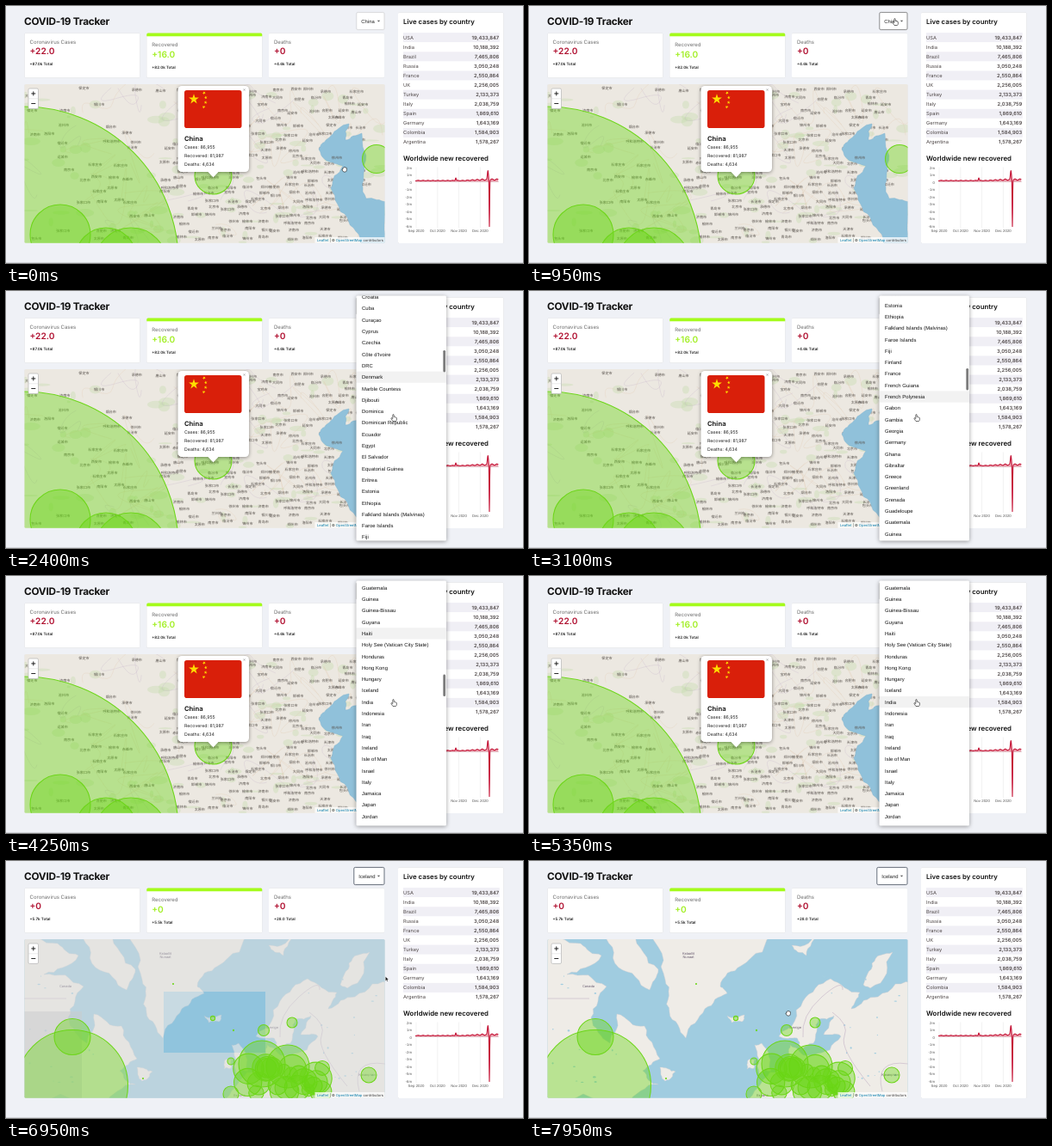
These frames come from a looping animation (600x299 px, 8000 ms). An HTML page:

```html
<!DOCTYPE html>
<html lang="en">
<head>
<meta charset="utf-8">
<title>COVID-19 Tracker</title>
<style>
  html, body { margin: 0; width: 100%; height: 100%; overflow: hidden; background: #eff1f6; }
  svg { display: block; width: 100vw; height: 100vh; }
  text { font-family: Inter, sans-serif; text-rendering: geometricPrecision; white-space: pre; }
  .menu text, .helv { font-family: "Liberation Sans", Arial, sans-serif; letter-spacing: .055px; }
  .cjk { font-family: "Noto Sans CJK SC", "Noto Sans CJK", sans-serif; font-weight: 500; }
  .card { fill: #fff; filter: drop-shadow(0 .6px .7px rgba(0,0,0,.2)); }
  .bubble { fill: #66d413; fill-opacity: .4; stroke: #6fd61c; stroke-width: 1.1; }
  .land { fill: #efece7; stroke: #c9c9cf; stroke-width: .4; }
</style>
</head>
<body>
<svg id="stage" viewBox="0 0 600 299" preserveAspectRatio="none"></svg>
<script>
const LOOP = 8000, PITCH = 13.3, SWITCH = 6870, CLOSE = 6530;
const CHINA = 10, ICELAND = 60;
const COUNTRIES = ("Cabo Verde|Cambodia|Cameroon|Canada|Caribbean Netherlands|Cayman Islands|" +
  "Central African Republic|Chad|Channel Islands|Chile|China|Colombia|Comoros|Congo|Costa Rica|Croatia|" +
  "Cuba|Curaçao|Cyprus|Czechia|Côte d'Ivoire|DRC|Denmark|Marble Countess|Djibouti|Dominica|" +
  "Dominican Republic|Ecuador|Egypt|El Salvador|Equatorial Guinea|Eritrea|Estonia|Ethiopia|" +
  "Falkland Islands (Malvinas)|Faroe Islands|Fiji|Finland|France|French Guiana|French Polynesia|Gabon|" +
  "Gambia|Georgia|Germany|Ghana|Gibraltar|Greece|Greenland|Grenada|Guadeloupe|Guatemala|Guinea|" +
  "Guinea-Bissau|Guyana|Haiti|Holy See (Vatican City State)|Honduras|Hong Kong|Hungary|Iceland|India|" +
  "Indonesia|Iran|Iraq|Ireland|Isle of Man|Israel|Italy|Jamaica|Japan|Jordan").split("|");
const LIVE = ("USA 19,433,847|India 10,188,392|Brazil 7,465,806|Russia 3,050,248|France 2,550,864|" +
  "UK 2,256,005|Turkey 2,133,373|Italy 2,038,759|Spain 1,869,610|Germany 1,643,169|" +
  "Colombia 1,584,903|Argentina 1,578,267").split("|").map(row => row.split(" "));
const CITIES = ("北京市 天津市 大同市 张家口市 承德市 唐山市 保定市 石家庄市 太原市 济南市 青岛市 烟台市 " +
  "徐州市 郑州市 洛阳市 西安市 兰州市 银川市 包头市 呼和浩特市 临汾市 长治市 邯郸市 沧州市 " +
  "运城市 宝鸡市 延安市 榆林市 南阳市 合肥市 南京市 宿迁市 赤峰市 锦州市").split(" ");

let seed = 11;
const rnd = () => (seed = (seed * 16807) % 2147483647) / 2147483647;
const between = (a, b) => a + rnd() * (b - a);
const times = (n, make) => Array.from({ length: n }, (_, i) => make(i)).join("");
const text = (x, y, s, size, fill = "#222", attrs = "") =>
  `<text x="${x}" y="${y}" font-size="${size}" fill="${fill}" ${attrs}>${s}</text>`;
const rect = (x, y, w, h, fill, attrs = "") =>
  `<rect x="${x}" y="${y}" width="${w}" height="${h}" fill="${fill}" ${attrs}/>`;
const path = (d, fill, attrs = "") => `<path d="${d}" fill="${fill}" ${attrs}/>`;
const ellipse = (x, y, rx, ry, fill, attrs = "") =>
  `<ellipse cx="${x}" cy="${y}" rx="${rx}" ry="${ry}" fill="${fill}" ${attrs}/>`;
const bubble = (x, y, r) => `<circle class="bubble" cx="${x}" cy="${y}" r="${r}"/>`;
const BOLD = 'font-weight="700"', SEMI = 'font-weight="600"', END = 'text-anchor="end"', MID = 'text-anchor="middle"';

// Closed coastline: every edge is split in halves that shift at random.
function coast(corners, wobble = .16, depth = 3) {
  let pts = corners.split(" ").map(p => p.split(",").map(Number));
  for (let n = 0; n < depth; n++)
    pts = pts.flatMap(([x, y], i) => {
      const [u, v] = pts[(i + 1) % pts.length], k = between(-wobble, wobble);
      return [[x, y], [(x + u) / 2 + (v - y) * k, (y + v) / 2 - (u - x) * k]];
    });
  return "M" + pts.map(p => p.map(c => c.toFixed(1)).join(" ")).join("L") + "Z";
}

function star(cx, cy, r, turn = 0) {
  const corner = i => {
    const a = turn + i * Math.PI / 5 - Math.PI / 2, k = i % 2 ? r * .38 : r;
    return `${cx + k * Math.cos(a)},${cy + k * Math.sin(a)} `;
  };
  return `<polygon points="${times(10, corner)}" fill="#ffde00"/>`;
}

function statCard(i, label, color, values, totals) {
  const active = i === 1, x = 21.5 + i * 141.75, dy = active ? 3.6 : 0, tx = x + 6;
  return rect(x, 31.5, 134, 52, "#fff", 'class="card" rx="1.5"') +
    (active ? path(`M${x} 35.3v-2.3q0-1.5 1.5-1.5h131q1.5 0 1.5 1.5v2.3z`, "#a4fb1b") : "") +
    text(tx, 43.6 + dy, label, 6, "#6c6c6c") +
    times(2, k => `<g class="at${k}">` + text(tx, 56.2 + dy, values[k], 10.2, color, SEMI) +
      text(tx, 69 + dy, totals[k] + " Total", 4.5, "#222", SEMI) + "</g>");
}

function chinaMap() {
  const woods = times(110, () => ellipse(between(22, 440), between(100, 276), between(2, 11), between(1, 6), "#c3dbac", 'opacity=".38"'));
  const hop = () => `${between(-30, 30)} ${between(-25, 25)}`;
  const roads = times(46, i => path(`M${between(22, 422)} ${between(92, 272)}q${hop()} ${hop()}t${hop()}t${hop()}`, "none",
    `stroke="${i % 3 ? "#e0c8b2" : "#c5b6c8"}" stroke-width=".4" opacity=".75"`));
  const label = (x, y) => text(x, y, CITIES[Math.floor(rnd() * CITIES.length)], 4.1, "#57514c", 'class="cjk" ' + MID);
  const labels = times(21, row => times(21, col => {
    const x = 32 + col * 19 + between(-6, 6), y = 99 + row * 8.6 + between(-2.5, 2.5);
    return rnd() < (x < 200 ? .2 : .68) ? label(x, y) : "";
  }));
  const sea = coast("363,166 377,151 398,137 394,156 413,148 416,190 418,224 442,228 442,280 412,280 396,246 377,212 391,186 372,180", .12);
  return rect(21, 91, 419, 185, "#ece8e1") + woods + roads + labels +
    path(sea, "#90c1da", 'stroke="#82b2cc" stroke-width=".4"') + label(384, 178) +
    bubble(20, 297, 180) + bubble(63, 266, 35) + bubble(116, 293, 35) + bubble(145, 300, 42) +
    bubble(240.5, 197.5, 21.5) + bubble(430, 178, 16.5);
}

function popup() {
  const smallStar = i => {
    const a = -.52 + i * .36;
    return star(216 + 16 * Math.cos(a), 109 + 16 * Math.sin(a), 2.1, a);
  };
  const lines = ["Cases: 86,955", "Recovered: 81,987", "Deaths: 4,634"];
  return `<g style="filter:drop-shadow(0 1px 2px rgba(0,0,0,.4))">` +
    rect(199.5, 93, 82.5, 100, "#fff", 'rx="4.5"') + path("M234 192.5h13l-6.5 7z", "#fff") + "</g>" +
    rect(207, 98, 66.5, 44, "#d91f0a", 'rx="2.8"') + star(218, 108.5, 6.2) + times(4, smallStar) +
    text(276.5, 99.3, "×", 5.5, "#999", MID) + text(207, 156.5, "China", 7.6, "#222", BOLD) +
    times(3, i => text(207, 166.4 + i * 9.9, lines[i], 5.25, "#222"));
}

function icelandMap() {
  const greenland = "140,80 158,138 163,176 182,206 204,172 230,154 222,146 246,122 285,80";
  const canada = "10,84 60,96 84,110 44,132 90,146 72,182 94,212 102,178 134,192 152,230 132,244 150,260 116,285 10,285";
  const baffin = "80,82 120,84 150,126 140,150 104,124";
  const europe = "290,204 318,163 350,137 384,153 374,172 405,158 450,140 450,290 245,290 272,254 303,226 303,214 330,226 362,204 342,202 354,180 336,184 330,212 314,218 311,206";
  const isles = ["230,180 250,179 247,187 235,188", "262,214 270,212 281,244 267,247", "254,232 262,231 261,241 253,242",
    "152,240 170,245 158,256", "305,98 340,84 322,110", "388,144 398,119 422,106 396,148"];
  const lands = [greenland, canada, baffin, europe, ...isles];
  const lakes = times(40, i => ellipse(i % 2 ? between(340, 435) : between(24, 104), between(130, 260), between(.4, 2), between(.3, 1.2), "#a2cde0"));
  const borders = path("M318 205Q315 180 340 158T364 150M352 176Q372 190 366 204T396 262M21 160H70M440 236Q400 230 410 268",
    "none", 'stroke="#b9a5bd" stroke-width=".5"');
  const name = (x, y, s) => text(x, y, s, 3.9, "#695c70", MID);
  const cluster = times(24, () => bubble(between(280, 368), between(240, 270), between(7, 19)));
  return rect(21, 91, 419, 185, "#a0cce0") + lands.map(l => path(coast(l), "", 'class="land"')).join("") + lakes + borders +
    name(185, 109, "Kalaallit") + name(185, 113.4, "Nunaat") + name(69, 147, "Canada") +
    name(309, 194.5, "Sverige") + name(271, 273.5, "España") + name(419, 250, "Қазақстан") +
    `<g id="haze"><path fill="#d9dbdc" fill-rule="evenodd" opacity=".48" d="M21 91H440V276H21ZM183 152V223H301V152Z"/>` +
    rect(183, 152, 118, 71, "#6fb4d8", 'opacity=".3"') + rect(21, 175, 67, 101, "#c9cccd", 'opacity=".5"') + "</g>" +
    bubble(77, 261, 64.5) + bubble(77, 204.5, 21) + bubble(240, 183, 2.6) + bubble(299, 197, 6.5) + bubble(332, 188, 6) +
    bubble(261, 233, 4) + bubble(421, 249, 9) + bubble(261, 271, 9) + bubble(297, 236, 27) + bubble(327, 239, 25) +
    bubble(194, 143, .5) + bubble(159, 253, .5) + bubble(264, 197, .6) + cluster;
}

function mapControls() {
  return rect(26, 96, 11.5, 23.5, "#fff", 'rx="1.5" stroke="#b5b5b5" stroke-width=".7"') +
    path("M26 107.8h11.5", "none", 'stroke="#ccc" stroke-width=".4"') +
    path("M29.3 101.9h5M31.8 99.4v5M29.3 113.5h5", "none", 'stroke="#111" stroke-width=".9"') +
    rect(358.5, 269, 81.5, 7, "#fff", 'opacity=".75"') +
    text(438, 273.9, `<tspan fill="#0078a8">Leaflet</tspan> | © <tspan fill="#0078a8">OpenStreetMap</tspan> contributors`, 4.1, "#333", END);
}

function trend(x) {
  const rise = Math.max(0, x - 530) * .05;
  const bump = 3.2 * Math.exp(-((x - 522) ** 2) * 2);
  const peak = 10 * Math.exp(-((x - 559.3) ** 2) * 1.5), drop = 54 * Math.exp(-((x - 561) ** 2) * 6);
  return 203.1 - Math.min(rise, 1.2) + Math.sin(x * 1.1) * (.25 + Math.min(rise, 1.2) * .4) - bump - peak + drop;
}

function sidePanel() {
  const rows = LIVE.map(([name, count], i) => {
    const y = 36.6 + i * 11.08;
    return (i % 2 ? "" : rect(461, y - 5.5, 111.8, 11, "#f0eff5")) +
      text(461, y + 2, name, 5.7, "#4d4646") + text(572.2, y + 2, count, 5.8, "#4d4646", SEMI + " " + END);
  }).join("");
  const ticks = times(9, i => text(471, 189.6 + i * 8.5, i === 2 ? "0" : 2 - i + "m", 4.2, "#555", 'class="helv" ' + END));
  const months = ["Sep", "Oct", "Nov", "Dec"].map((m, i) => {
    const x = 476 + i * 24.8;
    return path(`M${x} 187.5V258`, "none", 'stroke="#ddd" stroke-width=".4"') +
      text(x, 263.2, m + " 2020", 4.3, "#555", 'class="helv" ' + MID);
  }).join("");
  const line = "M475.5 203" + times(384, i => `L${475.5 + i / 4} ${trend(475.5 + i / 4).toFixed(2)}`);
  return rect(455, 7.5, 122.5, 268.5, "#fff", 'class="card" rx="1.5"') +
    text(461, 21.2, "Live cases by country", 7.85, "#111", SEMI) + rows +
    text(461, 179.5, "Worldwide new recovered", 7.85, "#111", SEMI) + ticks + months +
    path("M475.5 204.6H572", "none", 'stroke="#bbb" stroke-width=".4"') +
    path(line + "V204.6H475.5Z", "#cc1034", 'opacity=".4"') +
    path(line, "none", 'stroke="#c41335" stroke-width="1.1" stroke-linejoin="round"');
}

const picker = (x, name, i) => `<g class="at${i}">` +
  rect(x, 7.4, 439 - x, 20.2, "#fff", 'class="picker" rx="1.5"') +
  text(x + 5.4, 19.5, name, 5.9, "#222", 'class="helv"') + path("M430.8 16.7h3.4l-1.7 1.9z", "#555") + "</g>";

const rowTop = i => 7.65 + i * PITCH;
const menu = `<g id="menu" class="menu">` +
  rect(406.5, 5.5, 104.5, 285, "#fff", 'rx="1.5" style="filter:drop-shadow(0 1.8px 2.6px rgba(0,0,0,.38))"') +
  `<g clip-path="url(#menuClip)"><g id="list">` +
  rect(406.5, rowTop(CHINA), 104.5, PITCH, "#000", 'opacity=".07"') +
  rect(406.5, 0, 104.5, PITCH, "#000", 'id="hover" opacity=".05"') +
  `<g clip-path="url(#rowClip)"><circle id="ripple" cx="441" cy="${rowTop(ICELAND + .5)}" opacity=".12"/></g>` +
  COUNTRIES.map((c, i) => text(413, rowTop(i) + 8.75, c, 5.9, "#111")).join("") +
  `</g></g>` + rect(507.3, 49, 2.8, 25.5, "#7c7c7c", 'id="thumb" rx="1.4"') + "</g>";

const INK = 'stroke="#111" stroke-width=".6"';
const cursors = {
  pointer: path("M-1.2-2.6q0-.8.7-.8t.7.8v1.9q1.2-.2 1.3.4 1-.2 1.1.6.8-.1.8.8v1q0 1.6-1 2.4h-3.4q-.9-1.2-2-3-.3-.9.6-.8l1.2.8z", "#fff", INK),
  grab: path("M-2.1-1.2q.4-1.2 1.1-.6.4-1.3 1.2-.4 1-.7 1.2.4 1.1-.3 1 .9v1.6q-.2 1.8-1.2 2.3h-2.4q-.9-.8-1.8-2.4-.3-.9.9-.5z", "#fff", INK),
  arrow: path("M-.6-2.6v5l1.2-1 .8 1.8.8-.4-.8-1.7h1.6z", "#111", 'stroke="#fff" stroke-width=".3"')
};

const stage = document.getElementById("stage");
stage.innerHTML = `<defs>
  <clipPath id="mapClip"><rect x="21.5" y="91" width="418" height="184.7" rx="1.5"/></clipPath>
  <clipPath id="menuClip"><rect x="406.5" y="5.5" width="104.5" height="285" rx="1.5"/></clipPath>
  <clipPath id="rowClip"><rect x="406.5" y="${rowTop(ICELAND)}" width="104.5" height="${PITCH}"/></clipPath></defs>` +
  rect(0, 0, 600, 299, "#eff1f6") + rect(0, 298, 600, 1, "#d3d5da") +
  text(21, 21.7, "COVID-19 Tracker", 11.8, "#111", BOLD + ' letter-spacing="-.25"') +
  picker(406.8, "China", 0) + picker(403.8, "Iceland", 1) +
  statCard(0, "Coronavirus Cases", "#b01030", ["+22.0", "+0"], ["+87.0k", "+5.7k"]) +
  statCard(1, "Recovered", "#a2ef25", ["+16.0", "+0"], ["+82.0k", "+5.5k"]) +
  statCard(2, "Deaths", "#b01030", ["+0", "+0"], ["+4.6k", "+28.0"]) +
  rect(21.5, 91, 418, 184.7, "#ddd", 'class="card" rx="1.5"') +
  `<g clip-path="url(#mapClip)"><g class="at0">${chinaMap()}${popup()}</g><g class="at1">${icelandMap()}</g>${mapControls()}</g>` +
  sidePanel() + menu + `<g id="cursor">` +
  Object.entries(cursors).map(([id, shape]) => `<g id="${id}">${shape}</g>`).join("") + "</g>";

const ramp = (t, from, to) => Math.min(1, Math.max(0, (t - from) / (to - from)));
const smooth = u => u * u * (3 - 2 * u);

const MOVES = [
  { from: 250, to: 820, x: 425, y: 18 },
  { from: 1250, to: 1650, x: 450, y: 147 },
  { from: 5600, to: 6050, x: 441, y: 137 },
  { from: 7100, to: 7700, x: 301, y: 177 }
];
function cursorAt(t) {
  return MOVES.reduce((p, m) => {
    const k = smooth(ramp(t, m.from, m.to));
    return { x: p.x + (m.x - p.x) * k, y: p.y + (m.y - p.y) * k };
  }, { x: 393, y: 190 });
}

// Rows scrolled away, slowing down towards the end.
const scrollAt = t => 51.05 * (1 - (1 - ramp(t, 1800, 4250)) ** 1.29);

// The highlight follows the pointer only now and then while the list scrolls.
function hoverAt(t) {
  const sampled = t > 5000 ? t : 2256 + Math.floor((t - 2256) / 762) * 762;
  const y = sampled < 1650 ? 147 : cursorAt(sampled).y;
  return Math.floor((y - 7.65) / PITCH + scrollAt(sampled));
}

const el = id => document.getElementById(id);
const set = (node, attrs) => Object.entries(attrs).forEach(([k, v]) => node.setAttribute(k, v));
const show = (node, on) => node.style.display = on ? "" : "none";
const scenes = [0, 1].map(i => [...stage.querySelectorAll(".at" + i)]);
const pickers = [...stage.querySelectorAll(".picker")];

function draw(t) {
  const scene = t < SWITCH ? 0 : 1, focused = t > CLOSE;
  scenes.forEach((nodes, i) => nodes.forEach(n => show(n, i === scene)));
  pickers.forEach(p => set(p, {
    stroke: focused ? "#59606e" : t > 780 ? "#444" : "#c6c6c8", "stroke-width": focused ? .9 : .6
  }));

  const open = smooth(ramp(t, 1050, 1280)) - smooth(ramp(t, CLOSE, CLOSE + 210));
  const scroll = scrollAt(t), k = .75 + .25 * open;
  show(el("menu"), open > 0);
  set(el("menu"), { opacity: open, transform: `translate(423 147) scale(${k} ${k * k}) translate(-423 -147)` });
  set(el("list"), { transform: `translate(0 ${-scroll * PITCH})` });
  set(el("hover"), { y: rowTop(hoverAt(t)) });
  set(el("thumb"), { y: 49 + scroll * 1.285, opacity: 1 - ramp(t, 4700, 4950) });
  set(el("ripple"), { r: 70 * ramp(t, 6330, 6560) });
  set(el("haze"), { opacity: 1 - ramp(t, 6950, 7300) });

  const { x, y } = cursorAt(t);
  set(el("cursor"), { transform: `translate(${x} ${y})` });
  const overMap = x < 439.5 && y > 91 && (t < 1000 || t > 7000);
  const shape = overMap ? "grab" : t > 780 && t < 6740 ? "pointer" : "arrow";
  Object.keys(cursors).forEach(id => show(el(id), id === shape));
}

const start = performance.now();
function tick() {
  draw((performance.now() - start) % LOOP);
  requestAnimationFrame(tick);
}
tick();
</script>
</body>
</html>
```
